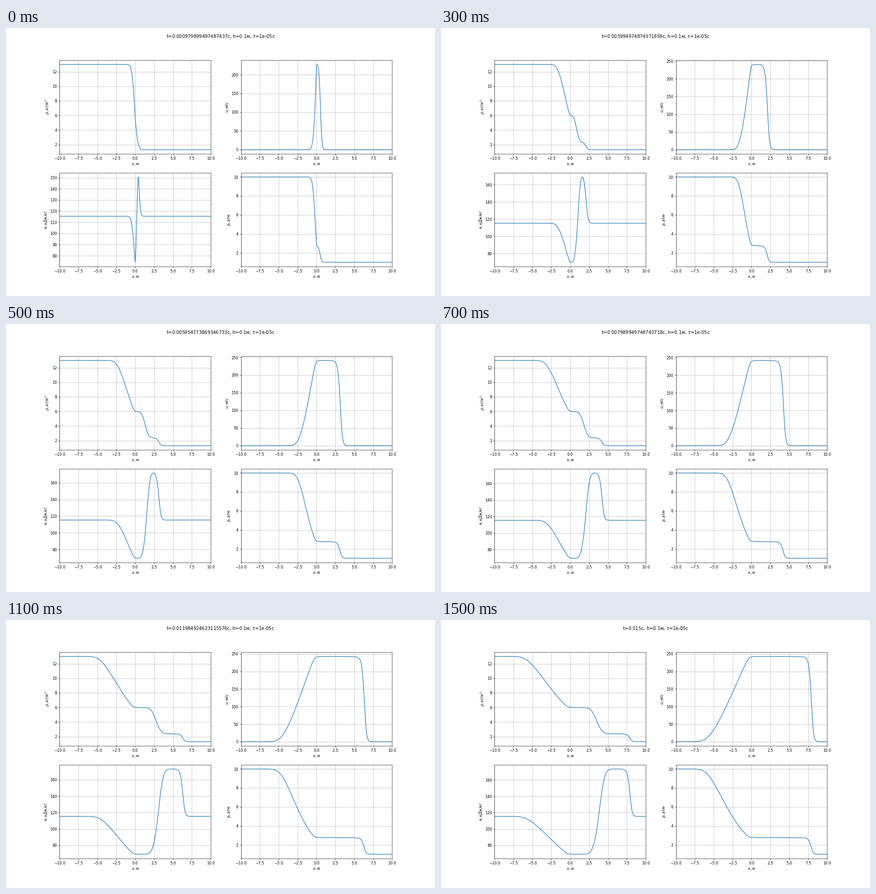
A matplotlib script for the animation above (1.6 s loop, 947 by 592 pixels).

```python
import numpy as np
import matplotlib.pyplot as plt
from matplotlib.animation import FuncAnimation

# Shock tube solved with a first-order characteristic upwind scheme.
GAMMA = 5 / 3
H, TAU, T_END = 0.1, 1e-5, 0.015
HALF = 100
ATM = 1e5
SNAPSHOTS = 200
FRAMES = 16


def initial_state():
    left = np.arange(2 * HALF + 1) < HALF
    rho = np.where(left, 13.0, 1.3)
    p = np.where(left, 10 * ATM, ATM)
    return np.array([rho, np.zeros_like(rho), p / (GAMMA - 1)])


def advance(w):
    """One time step for w = (rho, rho*u, rho*e), with fixed end nodes."""
    rho, mom, energy = w[:, 1:-1]
    u = mom / rho
    c = np.sqrt(GAMMA * (GAMMA - 1) * energy / rho)

    def project(d):
        p = (GAMMA - 1) * d[2]
        a = c * (d[1] - u * d[0])
        return np.array([p + a, p - c**2 * d[0], p - a])

    diff = np.diff(w, axis=1)
    speed = np.array([u + c, u, u - c])
    k = (np.maximum(speed, 0) * project(diff[:, :-1])
         + np.minimum(speed, 0) * project(diff[:, 1:]))

    dp = (k[0] + k[2]) / 2
    drho = (dp - k[1]) / c**2
    dmom = u * drho + (k[0] - k[2]) / (2 * c)
    new = w.copy()
    new[:, 1:-1] -= TAU / H * np.array([drho, dmom, dp / (GAMMA - 1)])
    return new


def solve():
    states = [initial_state()]
    for _ in range(round(T_END / TAU)):
        states.append(advance(states[-1]))
    return states


states = solve()
times = np.linspace(0, T_END, SNAPSHOTS)
x = (np.arange(2 * HALF + 1) - HALF) * H

dpi = 947 / 16
# The tiny extra keeps the pixel height from truncating to 591.
fig, axes = plt.subplots(2, 2, figsize=(947.001 / dpi, 592.001 / dpi), dpi=dpi)
title = fig.suptitle("")
labels = [r"$\rho, кг/м^3$", "$u, м/с$", "$e, кДж/кг$", "$p, атм$"]
lines = []
for ax, label in zip(axes.flat, labels):
    lines += ax.plot(x, x)
    ax.set_xlim(-10, 10)
    ax.set_xlabel("$x, м$")
    ax.set_ylabel(label)
    ax.grid()


def update(i):
    t = times[min(int((i + 1) * 13.25), SNAPSHOTS - 1)]
    rho, mom, energy = states[round(t / TAU)]
    curves = [rho, mom / rho, energy / rho / 1000, (GAMMA - 1) * energy / ATM]
    for ax, line, y in zip(axes.flat, lines, curves):
        line.set_ydata(y)
        ax.relim()
        ax.autoscale_view(scalex=False)
    title.set_text(rf"t={t}с, h={H}м, $\tau$={TAU}с")
    return [*lines, title]


anim = FuncAnimation(fig, update, frames=FRAMES, interval=100, repeat=True)
plt.show()
```
